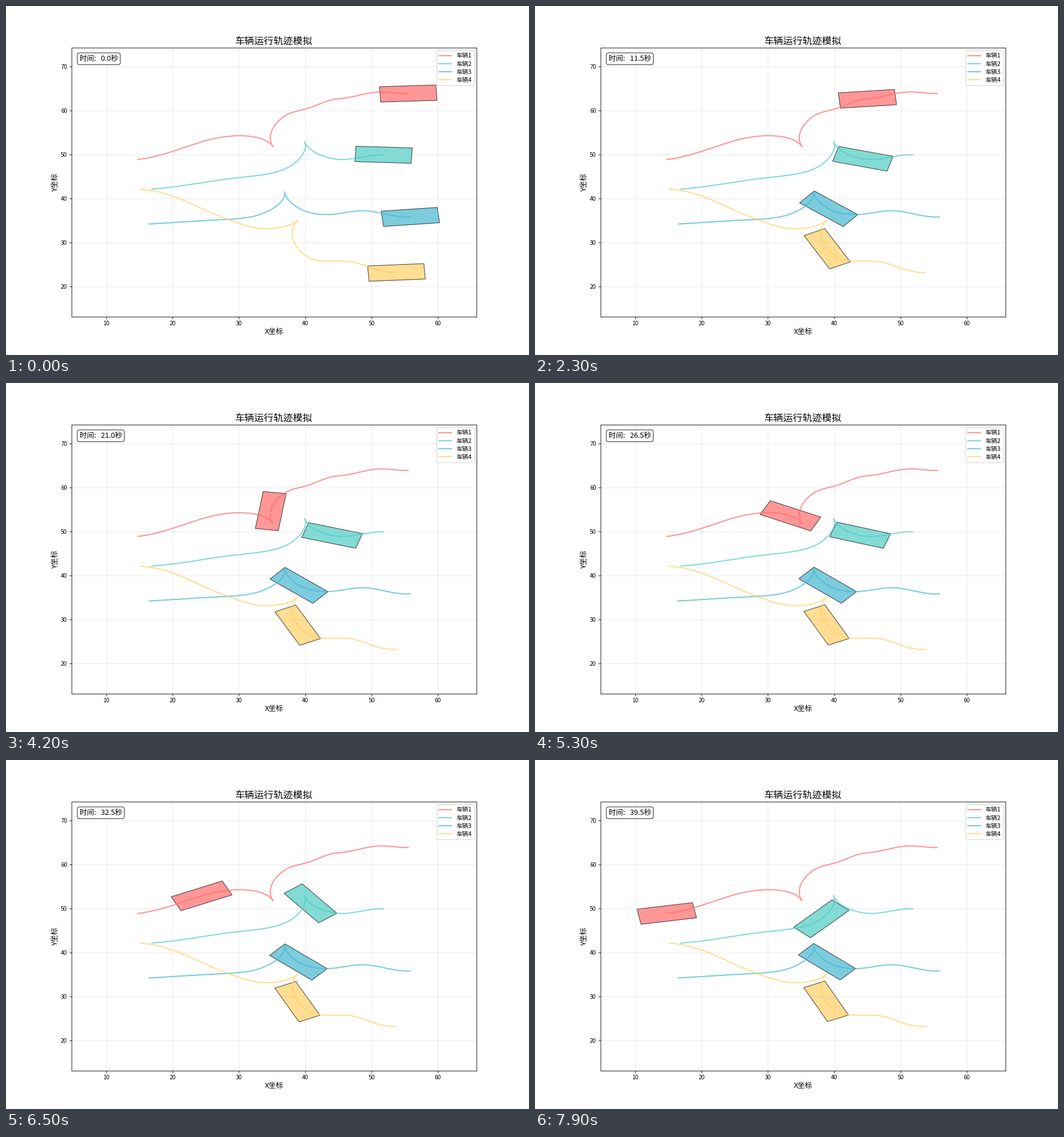
These frames come from a looping animation (917x611 px, 8 s). A matplotlib script:

```python
import numpy as np
import matplotlib.pyplot as plt
from matplotlib.animation import FuncAnimation
from matplotlib.patches import Polygon

W, H, DPI = 917, 611, 76.4
FRAMES, INTERVAL = 80, 100
LENGTH, WIDTH = 8.5, 3.5

plt.rcParams["font.family"] = ["Noto Sans CJK JP", "DejaVu Sans"]


def monotone(t, s, x, stops):
    """Monotone cubic through (t, s), at rest at the start and at the stops."""
    h = np.diff(t)
    d = np.diff(s) / h
    m = np.r_[0, 2 * d[:-1] * d[1:] / (d[:-1] + d[1:] + 1e-9), d[-1]]
    m[stops] = 0
    i = np.clip(np.searchsorted(t, x, side="right") - 1, 0, len(h) - 1)
    u = (x - t[i]) / h[i]
    return (s[i] * (1 + 2 * u) * (1 - u)**2 + s[i + 1] * u**2 * (3 - 2 * u)
            + h[i] * u * (1 - u) * (m[i] * (1 - u) - m[i + 1] * u))


class Car:
    """Reverses to a cusp, then drives forward.

    nodes: (x, y, heading in degrees); cusp: node where the gear changes;
    keys: (seconds, position counted in nodes).
    """

    def __init__(self, name, color, nodes, cusp, keys):
        self.name, self.color = name, color
        x, y, deg = np.array(nodes, float).T
        self.p = np.column_stack([x, y])
        gap = np.diff(self.p, axis=0)
        gear = np.where(np.arange(len(gap)) < cusp, -1, 1)
        self.reach = (gear * np.hypot(*gap.T))[:, None]
        a = np.radians(deg)
        self.nose = np.column_stack([np.cos(a), np.sin(a)])

        u = np.linspace(0, len(gap), 100 * len(gap) + 1)
        self.path = self.pose(u)[0]
        s = np.r_[0, np.cumsum(np.hypot(*np.diff(self.path, axis=0).T))]
        t, ku = np.array(keys, float).T
        now = np.arange(FRAMES) * INTERVAL / 1000
        pos = monotone(t, np.interp(ku, u, s), now, ku == cusp)
        self.center, self.along = self.pose(np.interp(pos, s, u))

    def pose(self, u):
        """Hermite position and unit tangent at node position u."""
        i = np.minimum(u.astype(int), len(self.reach) - 1)
        v = (u - i)[:, None]
        p, q = self.p[i], self.p[i + 1]
        a, b = self.nose[i] * self.reach[i], self.nose[i + 1] * self.reach[i]
        pos = (p + (q - p) * v**2 * (3 - 2 * v)
               + v * (1 - v) * (a * (1 - v) - b * v))
        vel = (6 * v * (1 - v) * (q - p)
               + a * (1 - v) * (1 - 3 * v) + b * v * (3 * v - 2))
        return pos, vel / np.hypot(*vel.T)[:, None]

    def corners(self, i):
        dx, dy = self.along[i]
        half = np.array([dx, dy]) * LENGTH / 2, np.array([-dy, dx]) * WIDTH / 2
        return [self.center[i] + half[0] * j + half[1] * k
                for j, k in ((-1, -1), (1, -1), (1, 1), (-1, 1))]


cars = [
    Car("车辆1", "#FF6B6B",
        [(55.53, 63.9, 2.6), (51.55, 64.27, 0), (45, 62.7, 5.3),
         (40.71, 60.68, 28), (37.19, 59.03, 41), (34.79, 54.68, 82),
         (35.16, 51.83, 118), (33.4, 53.61, 154), (24.37, 52.92, 205),
         (14.74, 48.91, 190)], 6,
        [(0, 0), (0.9, 0), (1.3, 0.33), (2.3, 2), (4.2, 5), (4.75, 6),
         (5.3, 7), (6.5, 8), (7.9, 9)]),
    Car("车辆2", "#4ECDC4",
        [(51.81, 49.98, -2.6), (44.34, 49.06, -15), (40.78, 51.22, -52),
         (39.9, 52.92, -74), (38.05, 47.7, -133), (29.27, 44.67, -170),
         (16.89, 42.19, -174)], 3,
        [(0, 0), (0.9, 0), (1.3, 0.175), (2.2, 1), (5.6, 1.13), (6.5, 2),
         (6.9, 3), (7.9, 4)]),
    Car("车辆3", "#45B7D1",
        [(55.85, 35.85, 5.7), (48.63, 37.26, 0), (43.21, 36.38, 0),
         (39.29, 37.61, -38), (36.89, 41.53, -84), (31.85, 35.88, -164),
         (27.55, 35.24, -176), (16.46, 34.24, -175)], 4,
        [(0, 0), (0.9, 3), (7.9, 3.11)]),
    Car("车辆4", "#FFD166",
        [(53.75, 23.23, 3.5), (49.91, 24.28, -30), (46.04, 25.79, -2),
         (42, 25.93, -10), (39.01, 28.47, -62), (38.01, 32.12, -90),
         (38.86, 35.1, -128), (34.17, 33.16, -180), (27.55, 35.76, -209),
         (15.17, 42.13, -184)], 6,
        [(0, 0), (0.9, 4), (7.9, 4.14)]),
]

fig, ax = plt.subplots(figsize=((W + 1e-4) / DPI, (H + 1e-4) / DPI), dpi=DPI)
fig.subplots_adjust(left=0.125, right=0.9, bottom=0.11, top=0.88)
ax.set(xlim=(4.73, 65.85), ylim=(13.2, 74.27))
ax.set_title("车辆运行轨迹模拟", fontsize=16)
ax.set_xlabel("X坐标", fontsize=12, labelpad=2.5)
ax.set_ylabel("Y坐标", fontsize=12, labelpad=2.5)
ax.tick_params(labelsize=9.5)
ax.grid(True, alpha=0.3)

bodies = []
for car in cars:
    ax.plot(*car.path.T, color=car.color, lw=2, alpha=0.7, label=car.name)
    bodies.append(ax.add_patch(Polygon(car.corners(0), closed=True, fc=car.color,
                                       ec="black", lw=1, alpha=0.7)))
ax.legend(loc="upper right", fontsize=10, labelspacing=0.4, borderaxespad=0.45)
clock = ax.text(0.02, 0.952, "", transform=ax.transAxes, fontsize=12,
                bbox=dict(boxstyle="round", fc="white", alpha=0.8))


def update(i):
    for car, body in zip(cars, bodies):
        body.set_xy(car.corners(i))
    clock.set_text(f"时间:   {i * 0.5:.1f}秒")
    return [*bodies, clock]


anim = FuncAnimation(fig, update, frames=FRAMES, interval=INTERVAL,
                     repeat=True, repeat_delay=0)
plt.show()
```
